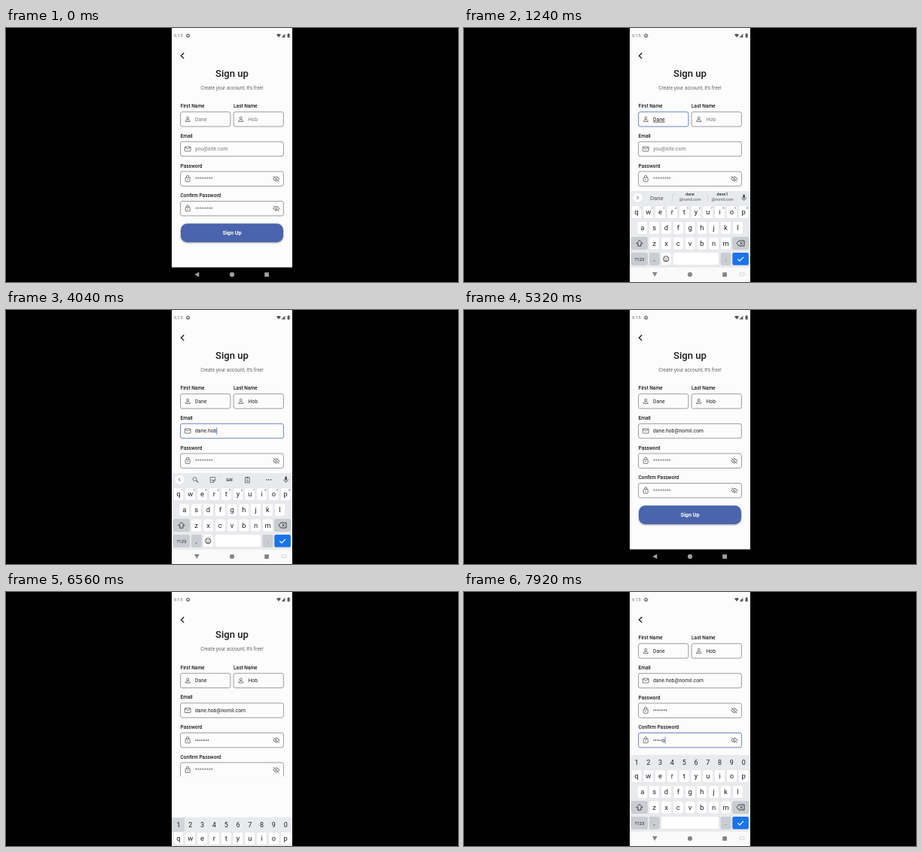
Recreate the animation shown at these times as an HTML page. Size 600 by 338 pixels, loop 8 s.

```html
<!DOCTYPE html>
<html lang="en">
<head>
<meta charset="utf-8">
<title>Sign up form</title>
<style>
  html, body { margin: 0; width: 100%; height: 100%; overflow: hidden; background: #000; }
  svg { display: block; width: 100vw; height: 100vh; font-family: Roboto, Inter, sans-serif; }
  text { white-space: pre; }
  .value { font-size: 6.7px; letter-spacing: .1px; }
  .icon { fill: none; stroke: #5a5a5a; stroke-width: .8; stroke-linejoin: round; }
  .button { filter: drop-shadow(0 1px 1px rgba(0, 0, 0, .4)); }
  .key { filter: drop-shadow(0 .5px .2px rgba(0, 0, 0, .22)); }
</style>
</head>
<body>
<svg id="stage" viewBox="0 0 600 338">
  <defs>
    <clipPath id="phoneClip"><rect x="220" width="160" height="338"/></clipPath>
    <clipPath id="pageClip"><rect id="view" x="220" y="48" width="160" height="270"/></clipPath>
  </defs>
  <rect width="600" height="338"/>
  <g clip-path="url(#phoneClip)">
    <rect x="220" width="160" height="338" fill="#fdfcfd"/>
    <g id="status"></g>
    <g clip-path="url(#pageClip)"><g id="page"></g></g>
    <g id="nav"></g>
    <g id="keyboard"></g>
  </g>
</svg>
<script>
const LOOP = 8000, KB_TOP = 217, KB_TRAVEL = 121, NAV_TOP = 318.5;
const PITCH = 15.8, FIRST_KEY = 229;
const FIRST = 'Dane', LAST = 'Hob', USER = 'dane', DOMAIN = '@nomil.com', SECRET = 'password';
const $ = id => document.getElementById(id);

function add(parent, tag, attrs, content) {
  const node = document.createElementNS('http://www.w3.org/2000/svg', tag);
  for (const name in attrs) node.setAttribute(name, attrs[name]);
  if (content !== undefined) node.textContent = content;
  parent.appendChild(node);
  return node;
}
// Text placed by its vertical centre.
const label = (parent, x, y, size, content, attrs = {}) =>
  add(parent, 'text', { x, y: y + size * .355, 'font-size': size, fill: '#1b1b1b', ...attrs }, content);
const mid = { 'text-anchor': 'middle' };
const line = (parent, d, attrs = {}) => add(parent, 'path', { class: 'icon', d, ...attrs });
const box = (parent, x, y, width, height, rx, fill, attrs = {}) =>
  add(parent, 'rect', { x, y, width, height, rx, fill, ...attrs });
const dot = (parent, cx, cy, r, fill, attrs = {}) => add(parent, 'circle', { cx, cy, r, fill, ...attrs });
const show = (node, on) => node.setAttribute('display', on ? 'inline' : 'none');

// Status bar and back arrow
const status = $('status');
label(status, 223, 10.2, 6, '6:15', { fill: '#757575' });
dot(status, 241.6, 10.2, 1.7, 'none', { stroke: '#666', 'stroke-width': 1.2 });
dot(status, 241.6, 10.2, 2.5, 'none', { stroke: '#666', 'stroke-width': .7, 'stroke-dasharray': '1.1 .86' });
add(status, 'path', { d: 'M359 8.8Q362 6.6 365 8.8L362 12.6ZM365.6 12.6H370.4V7.6Z', fill: '#555' });
box(status, 373.6, 7.8, 3, 5, .5, '#555');
box(status, 374.4, 7.2, 1.4, 1, 0, '#555');
line(status, 'M236.2 33.2L232.4 36.9L236.2 40.6', { style: 'stroke:#111;stroke-width:1.3;stroke-linejoin:miter' });

// Form
const page = $('page');
label(page, 300, 60.3, 13.1, 'Sign up', { ...mid, 'font-weight': 500 });
label(page, 300, 79.6, 6.5, 'Create your account, it’s free!', { ...mid, fill: '#666' });

const icons = {
  person(x, y) {
    dot(page, x, y - 1.7, 1.5, 'none', { class: 'icon' });
    line(page, `M${x - 3} ${y + 3.1}v-.9q.4-1.5 3-1.6q2.6.1 3 1.6v.9z`);
  },
  mail(x, y) {
    box(page, x - 3.9, y - 2.9, 7.8, 5.9, .6, 'none', { class: 'icon' });
    line(page, `M${x - 3.8} ${y - 2.4}l3.8 2.5l3.8-2.5`);
  },
  lock(x, y) {
    box(page, x - 3, y - 1.7, 6, 5.3, .6, 'none', { class: 'icon' });
    line(page, `M${x - 1.7} ${y - 1.7}v-1.1a1.7 1.7 0 0 1 3.4 0v1.1`);
    dot(page, x, y + .9, .75, '#5a5a5a');
  }
};
function eyeOff(x, y) {
  const dark = { style: 'stroke:#444;stroke-width:.9' };
  line(page, `M${x - 4} ${y}Q${x} ${y - 5.6} ${x + 4} ${y}Q${x} ${y + 5.6} ${x - 4} ${y}Z`, dark);
  dot(page, x, y, 1.3, '#444');
  line(page, `M${x - 3.2} ${y - 3.6}l6.8 7`, { style: 'stroke:#fdfcfd;stroke-width:2' });
  line(page, `M${x - 3.6} ${y - 3.6}l7.2 7.2`, dark);
}
function field(title, x, y, width, icon, hint, secret) {
  label(page, x, y - 17.5, 6.5, title, { 'font-weight': 500 });
  const frame = box(page, x, y - 9.7, width, 19.4, 2.4, 'none');
  icons[icon](x + 9.6, y);
  if (secret) eyeOff(358.8, y);
  const text = label(page, x + 19.4, y, 6.7, hint, { class: 'value' });
  const caret = box(page, x + 19.4, y - 4.6, .8, 9.2, 0, '#3f63c8');
  return { frame, text, caret, hint, x: x + 19.4 };
}
const fields = {
  first: field('First Name', 231.6, 121.4, 66.3, 'person', FIRST),
  last: field('Last Name', 302.1, 121.4, 66.3, 'person', LAST),
  email: field('Email', 231.6, 161, 136.8, 'mail', 'you@site.com'),
  pass: field('Password', 231.6, 200.7, 136.8, 'lock', '********', true),
  confirm: field('Confirm Password', 231.6, 240.2, 136.8, 'lock', '********', true)
};
box(page, 232, 260.3, 136, 24.8, 8.5, '#4a65ad', { class: 'button' });
label(page, 300, 272.8, 7.2, 'Sign Up', { ...mid, fill: '#fff', 'font-weight': 700 });

// Navigation bar
const nav = $('nav');
const navBar = box(nav, 220, NAV_TOP, 160, 20, 0, '#000');
const navIcons = add(nav, 'g', {});
const navBack = add(navIcons, 'path', { d: 'M250.3 328L256.3 324.7V331.3Z' });
dot(navIcons, 300, 328, 3.1, 'inherit');
box(navIcons, 343.2, 325.2, 5.8, 5.8, .4, 'inherit');
navIcons.querySelectorAll('circle, rect').forEach(n => n.removeAttribute('fill'));
const navKeys = box(nav, 366, 326, 6, 3.6, .5, 'none', { stroke: '#b5b5b5', 'stroke-width': .8, 'stroke-dasharray': '1 .5' });

// Keyboard
const kb = $('keyboard');
box(kb, 220, KB_TOP, 160, 101.7, 0, '#e8eaed');
const textMode = add(kb, 'g', {}), secretMode = add(kb, 'g', {});
const GREY = '#c9ccd1', INK = '#202124';
const key = (parent, x, y, width, fill = '#fff') =>
  box(parent, x - width / 2, y - 8.3, width, 16.6, 2.2, fill, { class: 'key' });

[['qwertyuiop', FIRST_KEY, 245], ['asdfghjkl', 236.9, 265.8], ['zxcvbnm', 252.7, 286.5]].forEach(([row, x0, y]) =>
  [...row].forEach((c, i) => {
    key(kb, x0 + i * PITCH, y, 13.4);
    label(kb, x0 + i * PITCH, y, 9.4, c, { ...mid, fill: INK });
  }));
const highlight = box(secretMode, 220, KB_TOP + .5, 17, 18.5, 0, '#d2d5da');
[...'1234567890'].forEach((c, i) => {
  const x = FIRST_KEY + i * PITCH;
  label(secretMode, x, 226.6, 9, c, { ...mid, fill: INK });
  kb.appendChild(textMode);
  label(textMode, x + 4.8, 240, 4, c, { ...mid, fill: '#555' });
});
key(kb, 232.9, 286.5, 21.4, GREY);
line(kb, 'M232.9 282.4L237 286.8H234.9V290.2H230.9V286.8H228.8Z', { style: `stroke:${INK}` });
key(kb, 367.1, 286.5, 21.4, GREY);
line(kb, 'M362 286.5L364.8 283H372V290H364.8ZM366.4 284.8L369.8 288.2M369.8 284.8L366.4 288.2', { style: `stroke:${INK}` });
key(kb, 232.9, 307.3, 21.4, GREY);
label(kb, 232.9, 307.5, 6, '?123', { ...mid, fill: INK });
key(kb, 252.7, 307.3, 13.4, GREY);
label(kb, 252.7, 307.6, 8, ',', { ...mid, fill: INK });
key(kb, 347.5, 307.3, 13.4, GREY);
label(kb, 347.5, 307.6, 8, '.', { ...mid, fill: INK });
key(kb, 367.1, 307.3, 21.4, '#1a73e8');
line(kb, 'M363.3 307.4L365.9 310L371 304.9', { style: 'stroke:#fff;stroke-width:1.1' });
key(secretMode, 300.1, 307.3, 76.6);
key(textMode, 268.2, 307.3, 13.4);
dot(textMode, 268.2, 307.3, 3.7, 'none', { stroke: INK, 'stroke-width': .8 });
line(textMode, 'M266.2 308.3Q268.2 311 270.2 308.3', { style: `stroke:${INK}` });
dot(textMode, 266.9, 306.2, .6, INK);
dot(textMode, 269.5, 306.2, .6, INK);
key(textMode, 307.8, 307.3, 61);

// Strip above the keys: tools or suggestions
dot(textMode, 230.5, 225.8, 6, '#fff');
const chevron = line(textMode, '', { style: 'stroke:#444;stroke-width:.9' });
box(textMode, 370.3, 221.6, 2.6, 5, 1.3, '#444');
line(textMode, 'M368.7 225.4a2.9 2.9 0 0 0 5.8 0M371.6 228.3V230', { style: 'stroke:#444' });

const tools = add(textMode, 'g', {});
dot(tools, 250.6, 225, 2.5, 'none', { class: 'icon' });
line(tools, 'M252.5 226.9L255.2 229.6', { style: 'stroke-width:1.1' });
line(tools, 'M271.2 222.6H277.6V227L275 229.4H271.2ZM277.6 226.8H275V229.4M272.6 225.9Q274 227.6 275.4 225.9');
label(tools, 296.8, 225.9, 6, 'GIF', { ...mid, fill: '#444', 'font-weight': 700 });
line(tools, 'M317.5 222.8H323.3V229.8H317.5ZM319.2 222.4H321.6V223.6H319.2ZM319 226H321.8M319 227.8H321.8');
[346, 348.8, 351.6].forEach(x => dot(tools, x, 225.9, .8, '#444'));

const hints = add(textMode, 'g', {});
const word = label(hints, 255.8, 226, 7.8, '', { ...mid, fill: '#555' });
[276.6, 323].forEach(x => box(hints, x, 220.5, .6, 10.5, 0, '#c8cbd0'));
const sideWords = [300, 343].map(x => [
  label(hints, x, 221.2, 5.4, '', { ...mid, 'font-weight': 500, fill: '#333' }),
  label(hints, x, 228, 5.2, '', { ...mid, fill: '#555' }),
  label(hints, x, 226, 7, '', { ...mid, fill: '#555' })
]);

// Motion
const clamp = v => Math.min(1, Math.max(0, v));
const easeOut = u => 1 - (1 - u) ** 2.5;
const ramp = (t, start, end) => clamp((t - start) / (end - start));
const typed = (t, text, start, step) =>
  text.slice(0, Math.max(0, Math.floor((t - start) / step) + 1));
const within = (t, spans) => spans.some(([a, b]) => t >= a && t < b);

const RISES = [440, 5860, 7160], FALLS = [5020, 6450], RISE_MS = 380, FALL_MS = 300;
function keyboardOffset(t) {
  const moves = [...RISES.map(s => [s, true]), ...FALLS.map(s => [s, false])].sort((a, b) => a[0] - b[0]);
  const move = moves.filter(m => m[0] <= t).pop();
  if (!move) return KB_TRAVEL;
  const [start, up] = move;
  const p = easeOut(clamp((t - start) / (up ? RISE_MS : FALL_MS)));
  return KB_TRAVEL * (up ? 1 - p : p);
}
// The page regains its height more slowly than the keyboard leaves.
function viewBottom(t, offset) {
  const fall = FALLS.find(s => t >= s && t < s + 400);
  if (fall === undefined) return Math.min(NAV_TOP, KB_TOP + offset);
  return KB_TOP + (NAV_TOP - KB_TOP) * ramp(t, fall, fall + 250) ** 1.57;
}
function scrollTop(t) {
  if (t < 7000) return 3.5 * (ramp(t, 6000, 6120) - ramp(t, 6570, 6700));
  return 25.5 * ramp(t, 7360, 7440) + 17.5 * ramp(t, 7440, 7560);
}
function masked(t, start, step) {
  const n = typed(t, SECRET, start, step).length;
  const peek = n && t < start + step * SECRET.length;
  return peek ? '•'.repeat(n - 1) + SECRET[n - 1] : '•'.repeat(n);
}

const FOCUS = [[360, 1440, 'first'], [1440, 2600, 'last'], [2600, 5040, 'email'], [5840, 6450, 'pass'], [7040, LOOP, 'confirm']];
const COMPOSING = { first: [800, 1440], last: [1840, 2600], email: [3120, 3680] };
const CARET_OFF = [[1240, 1440], [2960, 3120]];

function setHints(name, text) {
  word.textContent = text;
  const low = text.toLowerCase();
  const mails = name !== 'last';
  sideWords.forEach(([top, bottom, plain], i) => {
    top.textContent = mails ? low + (i ? '1' : '') : '';
    bottom.textContent = mails ? DOMAIN : '';
    plain.textContent = mails ? '' : text + (i ? 'by' : 's');
  });
}

function render(t) {
  const offset = keyboardOffset(t), up = offset < KB_TRAVEL - .01;
  kb.setAttribute('transform', `translate(0 ${offset})`);
  show(kb, up);
  $('view').setAttribute('height', viewBottom(t, offset) - 48);
  page.setAttribute('transform', `translate(0 ${-scrollTop(t)})`);

  navBar.setAttribute('fill', up ? '#fafafa' : '#000');
  navIcons.setAttribute('fill', up ? '#858585' : '#a0a0a0');
  navBack.setAttribute('transform', up ? 'rotate(-90 253.3 328)' : '');
  show(navKeys, up);

  const values = {
    first: typed(t, FIRST, 800, 80),
    last: typed(t, LAST, 1840, 120),
    email: typed(t, USER, 3120, 110) + typed(t, '.', 3680, 40) +
      typed(t, LAST.toLowerCase(), 3920, 60) + typed(t, DOMAIN, 4200, 88),
    pass: masked(t, 6120, 40),
    confirm: masked(t, 7700, 40)
  };
  const focus = (FOCUS.find(([a, b]) => t >= a && t < b) || [])[2];
  let composing = null;
  for (const name in fields) {
    const f = fields[name], value = values[name], active = name === focus;
    const marked = name in COMPOSING && within(t, [COMPOSING[name]]);
    if (marked) composing = name;
    f.text.textContent = value || f.hint;
    f.text.setAttribute('fill', value ? '#1b1b1b' : '#7a7a7a');
    f.text.setAttribute('text-decoration', marked ? 'underline' : 'none');
    f.frame.setAttribute('stroke', active ? '#4a65b5' : '#747474');
    f.frame.setAttribute('stroke-width', active ? .8 : .7);
    show(f.caret, active && !within(t, CARET_OFF));
    if (active) f.caret.setAttribute('x', f.x + (value ? f.text.getComputedTextLength() : 0));
  }

  const secret = t > 5500;
  show(textMode, !secret);
  show(secretMode, secret);
  show(highlight, within(t, [[6400, 6800]]));
  show(tools, !composing);
  show(hints, composing);
  chevron.setAttribute('d', composing ? 'M229.6 223.7L231.7 225.8L229.6 227.9' : 'M231.4 223.7L229.3 225.8L231.4 227.9');
  if (composing) setHints(composing, values[composing]);
}

const origin = performance.now();
function tick() {
  render((performance.now() - origin) % LOOP);
  requestAnimationFrame(tick);
}
tick();
</script>
</body>
</html>
```
